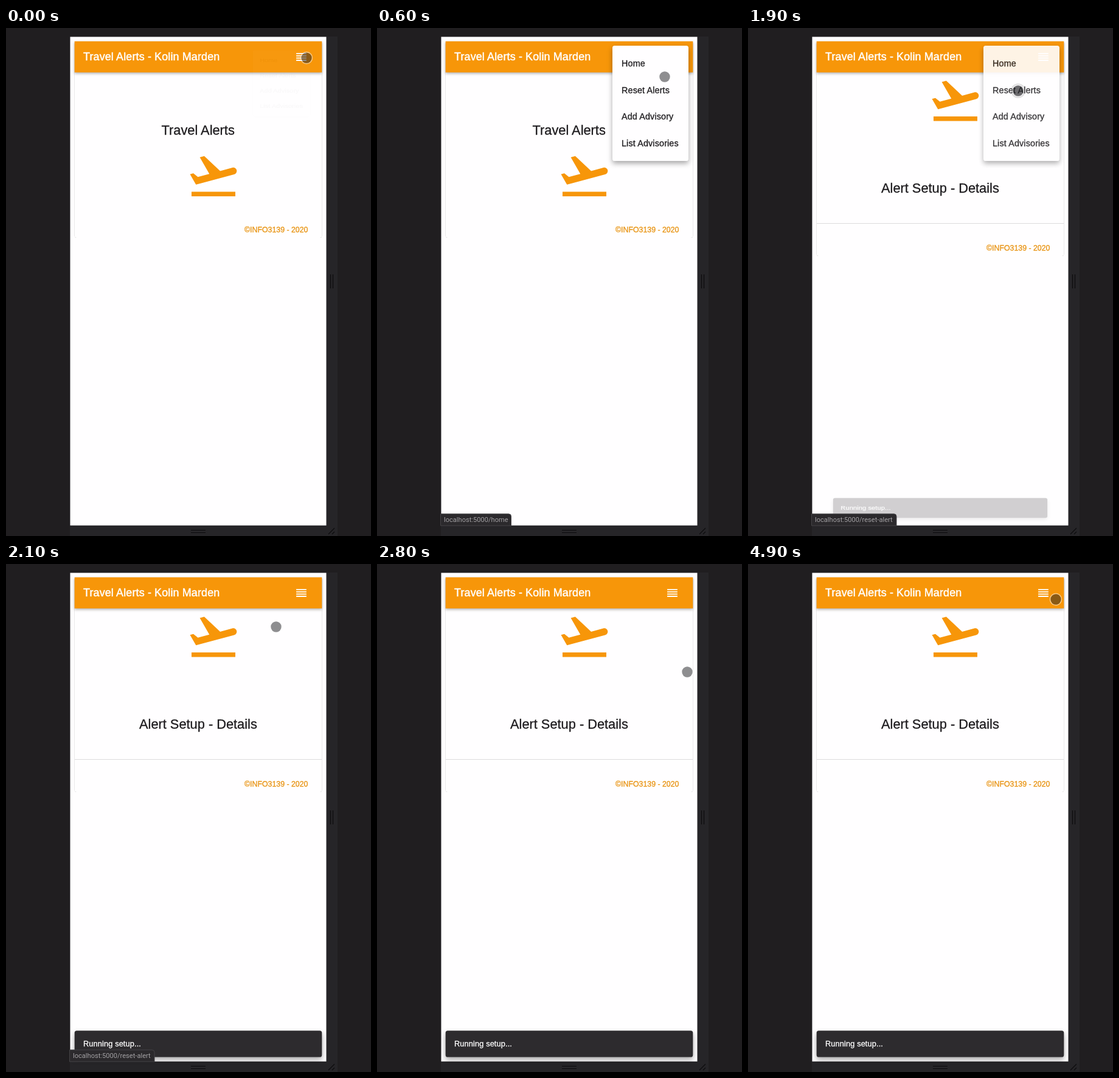
An HTML page that plays this animation: 600 by 833 pixels, repeating every 5000 ms.

```html
<!DOCTYPE html>
<html lang="en">
<head>
<meta charset="utf-8">
<title>Travel Alerts</title>
<style>
  html, body { margin: 0; width: 100%; height: 100%; overflow: hidden; background: #201e20; }
  svg { display: block; }
  text { font-family: "Liberation Sans", Arial, sans-serif; color: #1d1b1e; white-space: pre;
    fill: currentColor; stroke: currentColor; stroke-width: .3px; }
  .title { font-size: 17.95px; letter-spacing: .0075em; color: #fff; stroke-width: .45px; }
  .head { font-size: 21.8px; }
  .foot { font-size: 12.35px; color: #e8920f; }
  .item { font-size: 14.36px; letter-spacing: .0094em; }
  .note { font-size: 12.75px; letter-spacing: .0107em; color: #fff; }
  .url { font-family: Roboto, sans-serif; font-size: 11.1px; color: #a3a1a4; stroke: none; }
  .paper { fill: #fffeff; }
  .card { filter: drop-shadow(0 .9px .7px rgba(0,0,0,.4)); }
  .bar { fill: #f79609; filter: drop-shadow(0 2px 2px rgba(0,0,0,.3)); }
  .float { filter: drop-shadow(0 4px 4px rgba(0,0,0,.35)); }
  #menu { transform-origin: 464px 47px; }
  #snack { transform-origin: 316px 787px; }
</style>
</head>
<body>
<svg width="600" height="833" viewBox="0 0 600 833">
  <defs>
    <path id="plane" transform="scale(3.79)" fill="#f79609" d="M2.5 19h19v2h-19zM22.07 9.64c-.21-.8-1.04-1.28-1.84-1.06L14.92 10l-6.9-6.43-1.93.51 4.14 7.17-4.97 1.33-1.97-1.54-1.45.39 2.59 4.49L21 11.49c.81-.23 1.28-1.05 1.07-1.85z"/>
  </defs>

  <rect x="105" y="14" width="440" height="819" fill="#262528"/>
  <path d="M533.5 404v23M537.5 404v23M304 823.5h24M304 827.5h24M530 830l10-10M536 830l4-4" stroke="#0c0b0d" stroke-width="1.2"/>
  <rect class="paper" x="105.5" y="14.5" width="421" height="801.2"/>

  <g id="home">
    <rect class="paper card" x="112.7" y="22" width="406.6" height="322" rx="3.5"/>
    <text class="head" x="255.5" y="175">Travel Alerts</text>
    <use href="#plane" x="295.5" y="196.5"/>
    <text class="foot" x="392" y="335">©INFO3139 - 2020</text>
  </g>

  <g id="setup">
    <rect class="paper card" x="112.7" y="22" width="406.6" height="352" rx="3.5"/>
    <use href="#plane" x="295.5" y="73"/>
    <text class="head" x="219" y="269.5">Alert Setup - Details</text>
    <path d="M113 320.5h406" stroke="#dcdbdd"/>
    <text class="foot" x="392" y="365">©INFO3139 - 2020</text>
  </g>

  <rect class="bar" x="112.7" y="21.8" width="406.6" height="51"/>
  <text class="title" x="127" y="53">Travel Alerts - Kolin Marden</text>
  <path transform="translate(474.3 36.3) scale(.93)" fill="#fff" d="M3 5h18v2H3zm0 4h18v2H3zm0 4h18v2H3zm0 4h18v2H3z"/>

  <g id="menu">
    <rect class="paper float" x="387" y="29" width="125" height="189" rx="3.6"/>
  </g>

  <g id="snack">
    <rect class="float" x="112.7" y="765.2" width="406.6" height="43.3" rx="3.6" fill="#2d2b2e"/>
    <text class="note" x="127" y="791">Running setup...</text>
  </g>

  <g id="status">
    <path id="bubble" fill="#2b292c" stroke="#454346"/>
    <text id="url" class="url" x="110" y="810.3"></text>
  </g>

  <g id="cursor">
    <circle id="halo" r="12" fill="rgba(0,0,0,.12)"/>
    <circle r="9.4" fill="none" stroke="rgba(255,255,255,.5)" stroke-width="1.6"/>
    <circle id="dot" r="8.7" fill="rgb(30,30,34)"/>
  </g>
</svg>
<script>
const LOOP = 5000, TICK = 100, SWITCH = 1900;
const $ = id => document.getElementById(id);

['Home', 'Reset Alerts', 'Add Advisory', 'List Advisories'].forEach((label, i) => {
  const item = document.createElementNS('http://www.w3.org/2000/svg', 'text');
  item.setAttribute('class', 'item');
  item.setAttribute('x', 402);
  item.setAttribute('y', 63 + i * 43.6);
  item.textContent = label;
  $('menu').append(item);
});

const ramp = (t, from, to) => Math.min(1, Math.max(0, (t - from) / (to - from)));
const smooth = p => p * p * (3 - 2 * p);

// Grow transition: fades while scaling from three quarters to full size
function grow(el, opacity, size) {
  const s = .75 + .25 * size;
  el.style.opacity = opacity;
  el.style.transform = `scale(${s}, ${s * s})`;
}

function show(el, on) {
  el.style.display = on ? '' : 'none';
}

function pointer(t) {
  const reach = ramp(t, 0, 1200);
  const leave = smooth(ramp(t, 2100, 2750));
  const drift = ramp(t, 3600, 4900);
  const back = smooth(ramp(t, 4200, 4900));
  return [
    494 - 50 * reach ** 1.25 + 66 * leave - 4 * drift,
    49 + 54 * reach ** .8 + 74 * leave - 119 * back
  ];
}

function render(t) {
  const done = t >= SWITCH;
  show($('home'), !done);
  show($('setup'), done);

  const open = smooth(ramp(t, -20, 220));
  grow($('menu'), open * (1 - smooth(ramp(t, 1850, 2100))), open * (1 - ramp(t, 1900, 2100)));
  const rise = smooth(ramp(t, 1825, 2075));
  grow($('snack'), rise, Math.sqrt(rise));

  $('status').style.opacity = ramp(t, 200, 400) * (1 - ramp(t, 2100, 2400));
  $('url').textContent = 'localhost:5000/' + (done ? 'reset-alert' : 'home');
  $('bubble').setAttribute('d', `M104.5 816V796.8H${done ? 240 : 216.5}q4 0 4 4V816z`);

  const pressed = done && t < SWITCH + 200;
  $('cursor').setAttribute('transform', `translate(${pointer(t)})`);
  show($('halo'), pressed);
  $('dot').setAttribute('fill-opacity', pressed ? .6 : .5);
}

const start = performance.now();
function loop(now) {
  const t = Math.max(0, now - start) % LOOP;
  render(Math.floor(t / TICK) * TICK);
  requestAnimationFrame(loop);
}
render(0);
requestAnimationFrame(loop);
</script>
</body>
</html>
```
